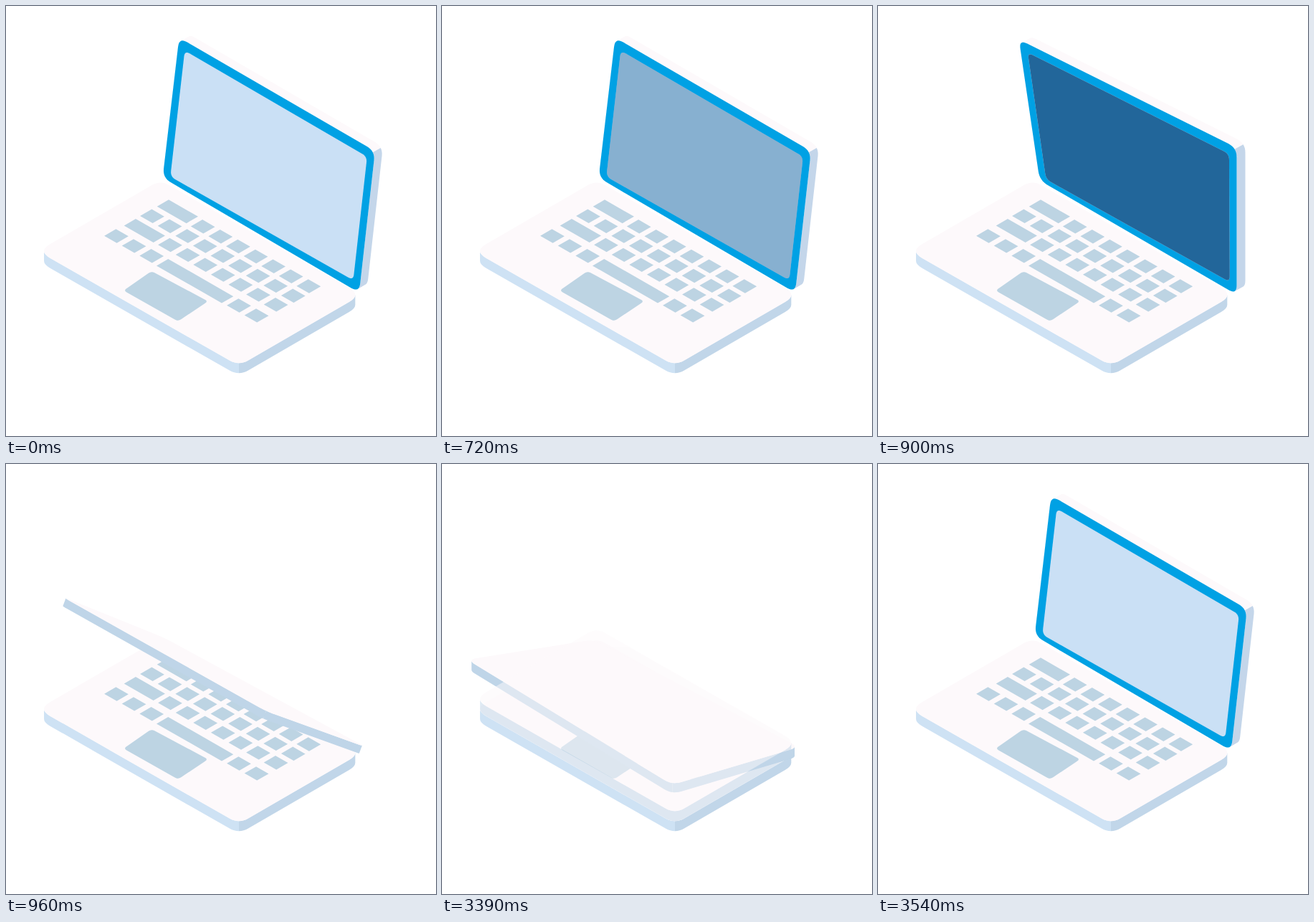
Animation, 600 px wide and 600 px high, one loop 3.6 s. Source, as an HTML page:

```html
<!DOCTYPE html>
<html lang="en">
<head>
<meta charset="utf-8">
<title>Laptop</title>
<style>
  html, body { margin: 0; width: 100%; height: 100%; overflow: hidden; background: #fff; }
  svg { display: block; width: 100vw; height: 100vh; }
</style>
</head>
<body>
<svg viewBox="0 0 600 600" xmlns="http://www.w3.org/2000/svg">
  <g id="base"></g>
  <path id="keys" fill="#bdd4e3"/>
  <g id="lid"></g>
  <g id="screen">
    <path id="light" fill="#cae0f5"/>
    <path id="dark" fill="#22669a"/>
  </g>
  <g id="cover"></g>
</svg>
<script>
const LOOP = 3600, STEP = 30;
const WHITE = '#fdf9fb', BLUE = '#00a1e4', SHADE = '#c1d6e9', EDGE = '#bfd5e8', SIDE = '#cee2f4';
const $ = id => document.getElementById(id);
const mix = (a, b, k) => a + (b - a) * k;
const add = (p, q) => [p[0] + q[0], p[1] + q[1]];
const lerp = (p, q, k) => p.map((v, i) => mix(v, q[i], k));
const toward = (p, q, d) => lerp(p, q, d / Math.hypot(q[0] - p[0], q[1] - p[1]));
const poly = pts => 'M' + pts.map(p => p[0].toFixed(2) + ' ' + p[1].toFixed(2)).join('L') + 'Z';

// Piecewise linear value at time t
function track(t, stops) {
  if (t <= stops[0][0]) return stops[0][1];
  for (let i = 1; i < stops.length; i++) {
    const [t0, a] = stops[i - 1], [t1, b] = stops[i];
    if (t <= t1) return mix(a, b, (t - t0) / (t1 - t0));
  }
  return stops[stops.length - 1][1];
}

// Points of a polygon with each corner cut to a quadratic curve
function rounded(pts, cuts, n = 8) {
  const out = [];
  pts.forEach((c, i) => {
    const a = toward(c, pts[(i + 3) % 4], cuts[i]);
    const b = toward(c, pts[(i + 1) % 4], cuts[i]);
    for (let j = 0; j <= n; j++) out.push(lerp(lerp(a, c, j / n), lerp(c, b, j / n), j / n));
  });
  return out;
}

function winding(pts) {
  let area = 0;
  pts.forEach((p, i) => {
    const q = pts[(i + 1) % pts.length];
    area += p[0] * q[1] - q[0] * p[1];
  });
  return Math.sign(area) || 1;
}

// Extruded slab: two groups of visible sides, split at the second corner, then the face
function slab(group, pts, cuts, off, colors) {
  const face = rounded(pts, cuts), s = winding(face), sides = ['', ''];
  face.forEach((p, i) => {
    const q = face[(i + 1) % face.length];
    const facing = s * ((q[1] - p[1]) * off[0] - (q[0] - p[0]) * off[1]);
    if (facing > 0) sides[i < 13 ? 0 : 1] += poly([p, q, add(q, off), add(p, off)]);
  });
  [...sides, poly(face)].forEach((d, i) => {
    const path = group.children[i] ||
      group.appendChild(document.createElementNS('http://www.w3.org/2000/svg', 'path'));
    path.setAttribute('d', d);
    path.setAttribute('fill', colors[i]);
  });
}

const BASE = [[44.6, 342], [325, 502], [496, 403], [215.6, 243]];
const BASE_CUTS = [19.5, 15, 20, 14];

function keyboard() {
  let d = '';
  const key = (x, y, w) => {
    const right = [x + w, y + w * 0.573], deep = [-16.3, 9.4];
    d += poly([[x, y], right, add(right, deep), add([x, y], deep)]);
  };
  const row = (x, y, n) => {
    for (let i = 0; i < n; i++) key(x - 0.6 + i * 24.6, y - 9.7 + i * 13.87, 17.5);
  };
  key(227, 270.3, 41);
  row(274.7, 307.8, 7);
  row(204, 293.3, 9);
  key(181, 297, 41);
  row(229, 333.5, 7);
  row(154, 321, 3);
  key(226.3, 353, 91);
  row(325, 418, 2);
  d += poly(rounded([[164, 397], [203, 370], [282, 412], [240, 440]], [5, 5, 5, 5]));
  $('keys').setAttribute('d', d);
}

// hinge left x y, hinge right x y, left angle and reach, right angle and reach, thickness x y
const POSES = [
  [215.6, 243, 496, 403, 0, 1, 0, 1, 0, -14],
  [212, 258, 498, 408, 20, 1.1, 13.7, 1.065, 0, -13],
  [225.6, 243.4, 500.5, 402.8, 81.1, 1.093, 90, 1.037, 12, -6.5],
  [218.6, 239.5, 492.8, 400, 98.3, 0.932, 97.9, 0.943, 11, -6.3]
];

function swing(hinge, deg, reach) {
  const a = deg * Math.PI / 180, c = reach * Math.cos(a), s = reach * Math.sin(a);
  return [hinge[0] - 171 * c, hinge[1] + 99 * c - 197.6 * s];
}

function drawLid(pose) {
  const i = Math.min(2, Math.floor(pose));
  const [lx, ly, rx, ry, la, lr, ra, rr, tx, ty] = lerp(POSES[i], POSES[i + 1], pose - i);
  const bl = [lx, ly], br = [rx, ry];
  const tl = swing(bl, la, lr), tr = swing(br, ra, rr);
  const inner = [tl, tr, br, bl], open = winding(inner) > 0;
  const cuts = pose < 1 ? BASE_CUTS : [13, 13, 13, 13];
  if (open) slab($('lid'), inner, cuts, [tx, ty], [WHITE, '#c4d6ea', BLUE]);
  else slab($('lid'), inner.map(p => add(p, [tx, ty])), cuts, [-tx, -ty], [EDGE, EDGE, WHITE]);

  $('screen').style.display = open ? '' : 'none';
  const at = (u, v) => lerp(lerp(tl, tr, u), lerp(bl, br, u), v);
  const glass = [at(0.034, 0.066), at(0.965, 0.067), at(0.965, 0.941), at(0.036, 0.963)];
  const d = poly(rounded(glass, [8, 8, 8, 8]));
  $('light').setAttribute('d', d);
  $('dark').setAttribute('d', d);
}

function draw(ms) {
  const t = Math.floor(ms / STEP) * STEP;
  drawLid(track(t, [[870, 3], [900, 2], [990, 1], [1020, 0],
    [3360, 0], [3390, 1], [3510, 2], [3540, 3]]));
  $('dark').setAttribute('opacity', track(t, [[600, 0], [900, 1], [3360, 1], [3540, 0]]));
  $('cover').setAttribute('opacity', track(t, [[960, 0], [1020, 1], [3360, 1], [3420, 0]]));
}

slab($('base'), BASE, BASE_CUTS, [0, 14], [SIDE, SHADE, WHITE]);
slab($('cover'), BASE.map(p => add(p, [0, -14])), BASE_CUTS, [0, 14], [SHADE, SHADE, WHITE]);
keyboard();

const start = performance.now();
function tick() {
  draw((performance.now() - start) % LOOP);
  requestAnimationFrame(tick);
}
tick();
</script>
</body>
</html>
```
